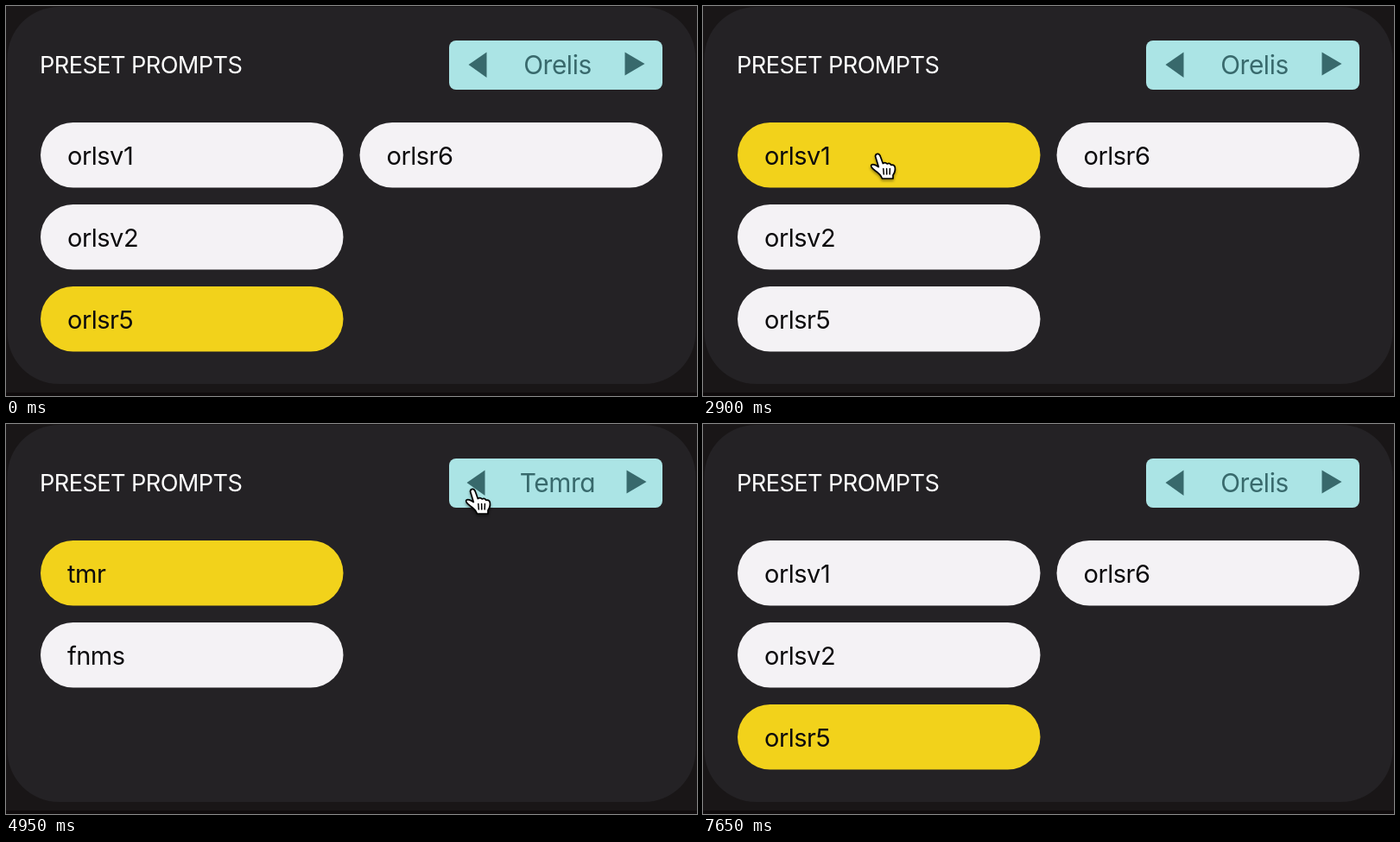
An HTML page that plays this animation: 800x452 px, repeating every 7.7 s.

```html
<!DOCTYPE html>
<html lang="en">
<head>
<meta charset="utf-8">
<title>Preset prompts</title>
<style>
  html, body { margin: 0; width: 100%; height: 100%; overflow: hidden; background: #191617; }
  svg { display: block; width: 800px; height: 452px; }
  text { font-family: Inter, "Open Sans", sans-serif; font-feature-settings: "cv11"; }
  .title { font-size: 27.2px; letter-spacing: -.6px; fill: #fff; }
  .label { font-size: 29px; letter-spacing: -.5px; fill: #0c0b0d; }
  .picker { font-size: 29.8px; letter-spacing: -.4px; fill: #38696c; }
  #cursor { filter: drop-shadow(0 2px 1.5px rgba(0, 0, 0, .4)); }
</style>
</head>
<body>
<svg viewBox="0 0 800 452">
  <rect width="800" height="452" fill="#191617"/>
  <rect y="448" width="800" height="4" fill="#0f0b0c"/>
  <rect x="1.5" y="1" width="797" height="437" rx="60" fill="#242225"/>
  <text class="title" x="39" y="78">PRESET PROMPTS</text>
  <rect x="513" y="40" width="247" height="57" rx="8" fill="#abe4e5"/>
  <g fill="#38696c">
    <path id="prev" d="M535.5 68L556.5 53.5V83Z"/>
    <path id="next" d="M716.5 53.5V80.5L739.5 67Z"/>
  </g>
  <text class="picker" id="name" x="638.5" y="79" text-anchor="middle"></text>
  <g id="pills"></g>
  <g id="cursor">
    <path id="arrow" d="M0 0V27L6 21.5L10.3 32L14.8 30L10.6 20H18Z"
          fill="#000" stroke="#fff" stroke-width="1.8"/>
    <g id="hand" stroke="#000" stroke-width="1.7" stroke-linecap="round" stroke-linejoin="round">
      <path fill="#fff" d="M-2.5 3Q-2 0 .7 .3Q2.8 .8 3.6 4L6.3 11.5Q9 9.5 11.2 12Q14 10.5 15.8 13.3Q19.5 12.5 20.3 16Q21 21 18 25V29H5.5Q3.5 24-2.5 20Q-8 16-7.3 13.5Q-5 11 1.3 15.5Z"/>
      <path fill="none" stroke-width="1.5" d="M6.8 17.5L7.3 24M10.6 17.5L10.8 24M14.4 17.5L14.2 24"/>
    </g>
  </g>
</svg>
<script>
const LOOP = 7700, STEP = 50;
const $ = id => document.getElementById(id);

const groups = {
  Orelis: { labels: ["orlsv1", "orlsv2", "orlsr5", "orlsr6"], spread: 0 },
  Temra: { labels: ["tmr", "fnms"], spread: 2 }
};

// Each state holds from its start time: [ms, group, selected pill]
const states = [
  [0, "Orelis", 2],
  [2650, "Orelis", 0],
  [3900, "Temra", 0],
  [5050, "Orelis", 0],
  [5850, "Orelis", 2]
];

// Cursor stops: [ms, x, y]
const path = [
  [1150, 235, 452], [1650, 202, 171], [3100, 202, 171],
  [3600, 732, 87], [3750, 722, 62], [4300, 722, 62],
  [4850, 540, 75], [5250, 540, 75],
  [5600, 202, 402], [5700, 204, 378], [6400, 204, 378]
];
const HOVER_START = 2400;

const pillBox = i => ({ x: 40 + 369.5 * Math.floor(i / 3), y: 135 + 95 * (i % 3), w: 350.5, h: 75.5 });
const pickerBox = { x: 513, y: 40, w: 247, h: 57 };
const inside = (b, x, y) => x >= b.x && x <= b.x + b.w && y >= b.y && y <= b.y + b.h;
const ease = p => p * p * (3 - 2 * p);

function drawState(group, selected) {
  const { labels, spread } = groups[group];
  $("name").textContent = group;
  $("prev").setAttribute("transform", `translate(${-spread} 0)`);
  $("next").setAttribute("transform", `translate(${spread} 0)`);
  $("pills").innerHTML = labels.map((label, i) => {
    const { x, y, w, h } = pillBox(i);
    return `<rect x="${x}" y="${y}" width="${w}" height="${h}" rx="${h / 2}" fill="${i === selected ? "#f2d21b" : "#f4f2f5"}"/>
      <text class="label" x="${x + 31}" y="${y + 48.5}">${label}</text>`;
  }).join("");
}

function drawCursor(t, group) {
  const next = path.findIndex(stop => stop[0] > t);
  const visible = next > 0;
  $("cursor").style.display = visible ? "" : "none";
  if (!visible) return;
  const [t0, x0, y0] = path[next - 1], [t1, x1, y1] = path[next];
  const p = ease((t - t0) / (t1 - t0));
  const x = x0 + (x1 - x0) * p, y = y0 + (y1 - y0) * p;
  const targets = [pickerBox, ...groups[group].labels.map((_, i) => pillBox(i))];
  const hovering = t >= HOVER_START && targets.some(box => inside(box, x, y));
  $("cursor").setAttribute("transform", `translate(${x} ${y})`);
  $("hand").style.display = hovering ? "" : "none";
  $("arrow").style.display = hovering ? "none" : "";
}

let current;
function render() {
  const t = Math.floor(performance.now() % LOOP / STEP) * STEP;
  const state = states.filter(s => s[0] <= t).pop();
  if (state !== current) drawState(state[1], state[2]);
  current = state;
  drawCursor(t, state[1]);
  requestAnimationFrame(render);
}
render();
</script>
</body>
</html>
```
